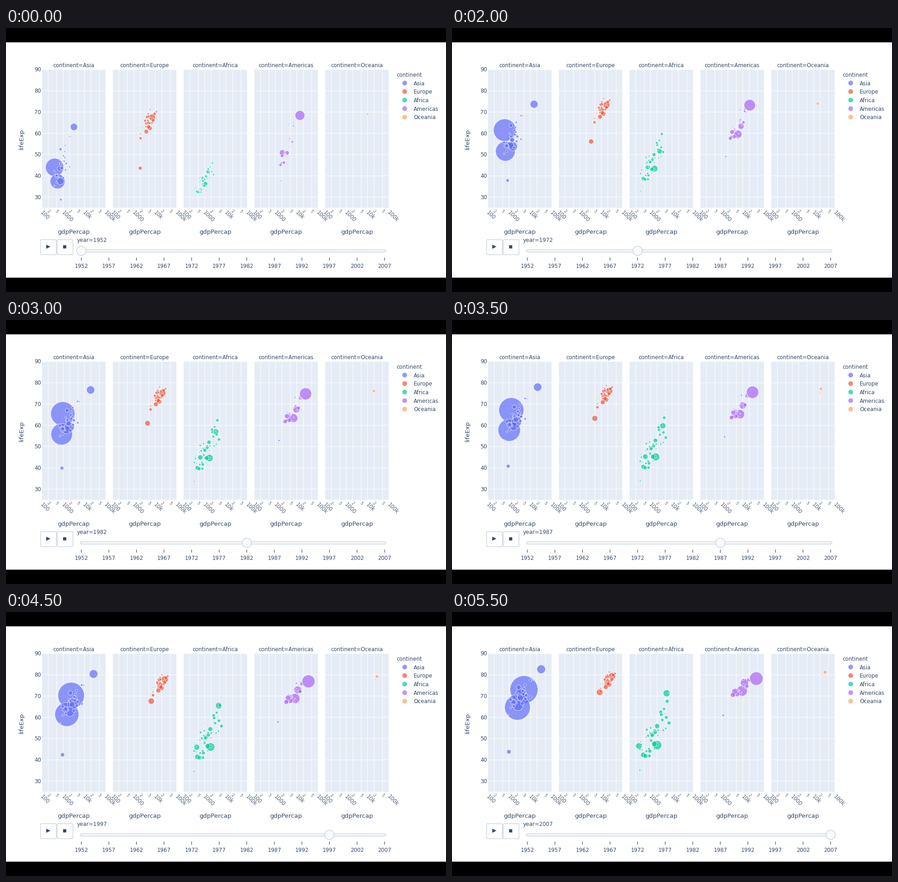
These frames come from a looping animation (966 by 580 pixels, 6 s). A matplotlib script:

```python
import numpy as np
import matplotlib.pyplot as plt
from matplotlib.animation import FuncAnimation
from matplotlib.patches import Circle, FancyBboxPatch, Polygon, Rectangle

W, H, DPI = 966, 580, 100
STEPS, INTERVAL = 12, 500
PT = 72 / DPI
INK, TICK_INK, BORDER, PALE = "#34486a", "#55657f", "#bec8d9", "#f8fafc"
COLORS = {"Asia": "#636efa", "Europe": "#ef553b", "Africa": "#00cc96",
          "Americas": "#ab63fa", "Oceania": "#ffa15a"}
LEFT, PITCH, PANEL_W, TOP, BOTTOM = 78.6, 155.4, 140.5, 91.3, 395
DECADE, YEAR_PX = PANEL_W / 3, 4.672
RADIUS_SCALE = 0.84

t = np.linspace(0, 1, STEPS)
rng = np.random.default_rng(7)


def blend(a, b, pace):
    """Go from a to b; pace < 1 starts fast, pace > 1 starts slowly."""
    return a + (b - a) * t ** pace


def track(start, end, pop, pace=1.0, life_pace=.7, dip=(0, 0)):
    """Log income, life expectancy and radius of one bubble at every step.

    start and end are (income, life), pop is (first, last) in millions.
    """
    income = blend(np.log10(start[0]), np.log10(end[0]), pace)
    life = blend(start[1], end[1], life_pace)
    dip_step, depth = dip
    life = life - depth * np.exp(-((np.arange(STEPS) - dip_step) / .5) ** 2)
    return income, life, RADIUS_SCALE * blend(*np.sqrt(pop), .8)


def crowd(count, start, end, pop, growth, pace, life_pace):
    """Smaller bubbles around a trend: richer ones tend to live longer.

    start and end are (income, spread in decades, life, spread in years).
    """
    tracks = []
    for _ in range(count):
        wealth, health, size = np.clip(rng.normal(size=3), -1.8, 1.8)
        health = .75 * wealth + .65 * health
        ends = [(income * 10 ** (spread * wealth), min(life + years * health, 82))
                for income, spread, life, years in (start, end)]
        last = pop * np.exp(size)
        tracks.append(track(*ends, (last / growth, last), pace, life_pace))
    return tracks


TRACKS = {
    "Asia": [
        track((400, 44), (4959, 73), (556, 1319), 1.73, .5, dip=(2, 12)),
        track((547, 37.4), (2452, 64.7), (372, 1110), 2, .65),
        track((750, 37.5), (3541, 70.7), (82, 224), .8),
        track((3217, 63), (31656, 82.6), (86, 127), .4, .6),
        track((685, 43.4), (2606, 65.5), (41, 169)),
        track((779, 28.8), (975, 43.8), (8.4, 32), life_pace=.5),
        *crowd(25, (1200, .32, 47, 8), (5200, .42, 71, 4.5), 18, 3, 1, .65),
    ],
    "Europe": [
        track((1969, 43.6), (8458, 71.8), (22, 71), 1, .8),
        track((7144, 67.5), (32170, 79.4), (69, 82), .5),
        *crowd(26, (5300, .23, 66, 4), (22000, .21, 77.8, 2.7), 11, 1.25, .55, .65),
    ],
    "Africa": [
        track((1077, 36.3), (2014, 46.9), (33, 135), .6, .4),
        track((1419, 41.9), (5581, 71.3), (22, 80), .8, 1.1),
        track((781, 39.1), (278, 46.5), (14, 65), 2.5, .4),
        *crowd(47, (950, .24, 38.8, 4), (1500, .38, 54, 7.5), 9, 3.7, .9, .45),
    ],
    "Americas": [
        track((13990, 68.4), (42952, 78.2), (158, 301)),
        track((2109, 50.9), (9066, 72.4), (57, 190), .35, .9),
        track((3478, 50.8), (11978, 76.2), (30, 109), .35),
        track((1840, 37.6), (1202, 60.9), (3.2, 8.5)),
        *crowd(20, (3300, .21, 53, 8), (7400, .25, 73.5, 3), 9, 3, .5, .7),
    ],
    "Oceania": [
        track((10040, 69.1), (34435, 81.2), (8.7, 20.4), 1, .9),
        track((10557, 69.4), (25185, 80.2), (2, 4.1), .6, 1.3),
    ],
}
TRACKS = {name: np.array(tracks) for name, tracks in TRACKS.items()}

fig = plt.figure(figsize=(W / DPI, H / DPI), dpi=DPI, facecolor="white")
ax = fig.add_axes([0, 0, 1, 1])
ax.set(xlim=(0, W), ylim=(H, 0))
ax.axis("off")


def label(x, y, text, size=11.7, **kw):
    kw = {"ha": "center", "va": "center_baseline", "color": INK, **kw}
    return ax.text(x, y - .7, text, fontsize=size * PT, family="DejaVu Sans", **kw)


def rounded(x0, y0, x1, y1, r, fill):
    ax.add_patch(FancyBboxPatch(
        (x0, y0), x1 - x0, y1 - y0, boxstyle=f"round,pad=0,rounding_size={r}",
        fc=fill, ec=BORDER, lw=1.1 * PT))


def box(x, y, w, h, fill):
    return ax.add_patch(Rectangle((x, y), w, h, fc=fill, lw=0, snap=False))


def life_y(life):
    return 371.5 - (life - 30) * YEAR_PX


def slider_x(step):
    return 165.4 + 60.53 * step


def log_ticks():
    """Offset from the panel's left edge, label and whether it is a full decade."""
    for power, text in enumerate(("100", "1000", "10k", "100k")):
        yield DECADE * power, text, True
        if power < 3:
            for digit in (2, 5):
                yield DECADE * (power + np.log10(digit)), str(digit), False


def panel(index, name):
    x0 = LEFT + index * PITCH
    mid = x0 + PANEL_W / 2
    back = box(x0, TOP, PANEL_W, BOTTOM - TOP, "#e5ecf6")
    grid = dict(color="white", lw=1.1 * PT, zorder=1.5, snap=False, clip_path=back)
    for offset, text, full in log_ticks():
        x = x0 + offset
        ax.plot([x, x], [TOP, BOTTOM], **grid)
        label(x - 1.7, 404 if full else 402.3, text, 11.7 if full else 8.4,
              color=TICK_INK, rotation=-45, rotation_mode="anchor",
              ha="left", va="center")
    for life in range(30, 100, 10):
        ax.plot([x0, x0 + PANEL_W], [life_y(life)] * 2, **grid)
    label(mid, 82, f"continent={name}")
    label(mid, 449.5, "gdpPercap", 13.4, va="center")
    dots = ax.scatter([], [], color=COLORS[name], edgecolors="white",
                      linewidths=PT, alpha=.7, zorder=3)
    dots.set_clip_path(back)
    return dots


box(0, 0, W, 31.5, "black")
box(0, 548.5, W, 31.5, "black")
bubbles = {name: panel(i, name) for i, name in enumerate(COLORS)}
for life in range(30, 100, 10):
    label(77.3, life_y(life), life, ha="right")
label(34, 244.7, "lifeExp", 13.4, rotation=90, va="center")

label(857.5, 102.5, "continent", ha="left")
for i, (name, color) in enumerate(COLORS.items()):
    y = 121 + 18.7 * i
    ax.add_patch(Circle((875.3, y), 5.5, fc=color, ec="white", lw=PT, alpha=.7))
    label(895, y + .3, name, ha="left")

rounded(76, 465, 110.5, 498, 2.2, "white")
rounded(112.5, 465, 147, 498, 2.2, "white")
ax.add_patch(Polygon([(88.3, 476), (97.3, 480.5), (88.3, 485)], fc=INK, lw=0))
box(125.3, 477.3, 7, 7, INK)

rounded(163.5, 487, 834, 492.3, 2.5, PALE)
for step in range(STEPS):
    x = slider_x(step)
    ax.plot([x, x], [504.5, 511], color="#333333", lw=1.1 * PT,
            solid_capstyle="butt", snap=False)
    label(x, 522.5, 1952 + 5 * step)
grip = ax.add_patch(Circle((0, 0), 10.2, fc=PALE, ec=BORDER, lw=1.1 * PT, zorder=4))
year = label(155.5, 465.5, "", ha="left")


def update(step):
    for i, name in enumerate(COLORS):
        income, life, radius = TRACKS[name][:, :, step].T
        x = LEFT + i * PITCH + DECADE * (income - 2)
        bubbles[name].set_offsets(np.column_stack([x, life_y(life)]))
        bubbles[name].set_sizes((2 * radius * PT) ** 2)
    grip.center = (slider_x(step), 489.5)
    year.set_text(f"year={1952 + 5 * step}")
    return [*bubbles.values(), grip, year]


anim = FuncAnimation(fig, update, frames=STEPS, interval=INTERVAL,
                     repeat=True, repeat_delay=0)
plt.show()
```
